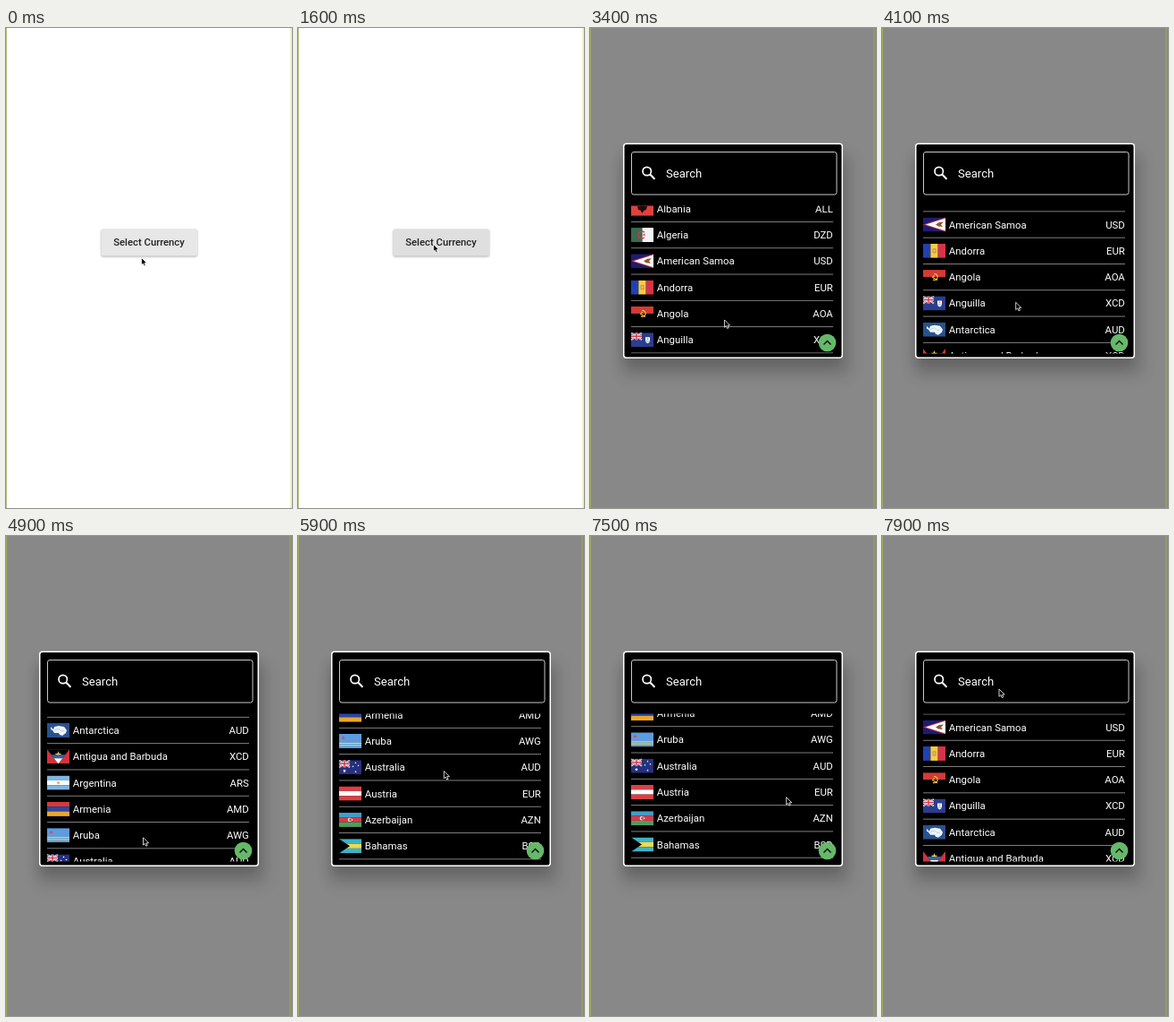
Animation of 320 by 536 pixels, one loop 8 s. Source, as an HTML page:

```html
<!DOCTYPE html>
<html lang="en">
<head>
<meta charset="utf-8">
<title>Currency picker</title>
<style>
  html, body { margin: 0; width: 100%; height: 100%; overflow: hidden; background: #fff; }
  svg { display: block; width: 320px; height: 536px; }
  text { font: 11.4px Roboto, sans-serif; fill: #fff; }
  .button { font-size: 11.3px; font-weight: 500; fill: #222; text-anchor: middle; }
  .search { font-size: 13.1px; }
  .code { text-anchor: end; }
  .soft { filter: blur(8px); }
  .lift { filter: drop-shadow(0 1px 1px rgba(0, 0, 0, .32)); }
</style>
</head>
<body>
<svg viewBox="0 0 320 536">
  <defs>
    <clipPath id="view"><rect x="40" y="198.5" width="240" height="165"/></clipPath>
    <clipPath id="flag"><rect width="25" height="16"/></clipPath>
  </defs>
  <rect id="button" class="lift" x="106.5" y="224.5" width="107.5" height="30" rx="2"/>
  <text class="button" x="160" y="243.3">Select Currency</text>

  <g id="dialog">
    <rect width="320" height="536" fill="#888"/>
    <rect class="soft" x="34" y="139" width="260" height="252" rx="8" opacity=".09"/>
    <rect class="soft" x="38" y="145" width="245" height="234" rx="6" opacity=".2"/>
    <rect x="37.75" y="129.25" width="244.5" height="239" rx="3" stroke="#fff" stroke-width="1.5"/>
    <rect x="46.5" y="138.5" width="229.5" height="47.5" rx="2.5" fill="none" stroke="#c8c8c8"/>
    <g fill="none" stroke="#fff" stroke-width="1.7">
      <circle cx="63.7" cy="160" r="4.7"/>
      <path d="M67 163.3l5.4 5.4" stroke-width="2"/>
    </g>
    <text class="search" x="85" y="166.6">Search</text>
    <g clip-path="url(#view)"><g id="list"></g></g>
    <rect id="hover" x="255.5" y="342" width="20" height="19" fill="#66bb6a" opacity=".45"/>
    <circle cx="265.5" cy="351.5" r="9.8" fill="#66b96a"/>
    <path d="M261.5 353.5l4-4 4 4" fill="none" stroke="#111" stroke-width="1.5"/>
  </g>

  <rect id="left" width="1" height="536"/>
  <rect id="right" height="536"/>
  <path id="cursor" d="M0 0V8.3L1.9 6.6 3.2 9.5 4.7 8.9 3.5 6.1H6.1Z" fill="#000" stroke="#fff" stroke-width=".8"/>
</svg>
<script>
const $ = id => document.getElementById(id);

// Flag drawing on a 25 x 16 field
const rect = (x, y, w, h, fill) => `<rect x="${x}" y="${y}" width="${w}" height="${h}" fill="${fill}"/>`;
const dot = (x, y, r, fill) => `<circle cx="${x}" cy="${y}" r="${r}" fill="${fill}"/>`;
const shape = (d, fill) => `<path d="${d}" fill="${fill}"/>`;
const line = (d, stroke, width) => `<path d="${d}" fill="none" stroke="${stroke}" stroke-width="${width}"/>`;
const field = fill => rect(0, 0, 25, 16, fill);
const rows = (...colors) => colors.map((c, i) => rect(0, i * 16 / colors.length, 25, 16 / colors.length, c)).join('');
const cols = (...colors) => colors.map((c, i) => rect(i * 25 / colors.length, 0, 25 / colors.length, 16, c)).join('');
const moon = (x, y, r, fill, back) => dot(x, y, r, fill) + dot(x + r * .35, y, r * .78, back);
const star = (x, y, r, fill) => {
  const points = Array.from({ length: 10 }, (_, i) => {
    const a = i * Math.PI / 5, d = i % 2 ? r * .42 : r;
    return `${x + d * Math.sin(a)},${y - d * Math.cos(a)}`;
  });
  return `<polygon points="${points.join(' ')}" fill="${fill}"/>`;
};
const jack = line('M0 0L12 8M12 0L0 8', '#fff', 1.8) + line('M0 0L12 8M12 0L0 8', '#d33a48', .7) +
  line('M6 0V8M0 4H12', '#fff', 2.8) + line('M6 0V8M0 4H12', '#d33a48', 1.5);

const countries = [
  ['Afghanistan', 'AFN', cols('#000', '#bd2a25', '#1d7a35') + line('M10 8a2.5 2.5 0 1 0 5 0a2.5 2.5 0 1 0-5 0', '#e8c9c0', .8) + rect(11.5, 7, 2, 2, '#e8c9c0')],
  ['Albania', 'ALL', field('#e0413c') + shape('M12.5 4.5L10.5 3l-1 1.5 1 1L7 5l1 4 2.5 1 2 3 2-3L17 9l1-4-3.500.5 1-1-1-1.500z', '#1c0a0a')],
  ['Algeria', 'DZD', cols('#3a6b50', '#f4f4f4') + line('M15 5.200a4 4 0 1 0 0 5.600', '#d6344a', 1.300) + star(14.5, 8, 1.8, '#d6344a')],
  ['American Samoa', 'USD', field('#1d1c70') + shape('M0 8L25 0V16Z', '#c8344a') + shape('M3 8L25 1V15Z', '#fff') + shape('M14 8l4-2.500 5-.5-3 3 2 2.500-5-.5z', '#8a5a2b')],
  ['Andorra', 'EUR', cols('#2140b4', '#f3d03e', '#d6334b') + rect(10.5, 5.5, 4, 5, '#c78a55') + rect(11.5, 6.5, 2, 3, '#e8c080')],
  ['Angola', 'AOA', rows('#d43a36', '#000') + line('M12 4.500a3.500 3.500 0 1 1-1 6.500M10 8l6 3.500', '#f0c440', 1.1) + star(12, 7, 1.4, '#f0c440')],
  ['Anguilla', 'XCD', field('#2b3d8e') + jack + shape('M16 5h5v4q0 2-2.500 3-2.500-1-2.500-3z', '#fff') + rect(16.2, 9, 4.6, 1, '#63b9d6') + dot(18.5, 7, 1.1, '#ef9b3c')],
  ['Antarctica', 'AUD', field('#28528f') + shape('M4 4l3 3 1-3 5-1 6 1 3 4-1 3-4 3-3-1-1-2-5 0-2-3-2-1z', '#edf3f8') + line('M8 8l5-2 3 3 3-1', '#9db9d8', .6)],
  ['Antigua and Barbuda', 'XCD', field('#d2333f') + shape('M0 0H25L12.5 16Z', '#000') + star(12.5, 6, 4, '#f5d040') + shape('M4.500 6H20.500L17.300 10H7.700Z', '#2f63b8') + shape('M7.700 10H17.300L12.500 16Z', '#fff')],
  ['Argentina', 'ARS', rows('#7db7e4', '#fff', '#7db7e4') + dot(12.5, 8, 1.7, '#e8b54a')],
  ['Armenia', 'AMD', rows('#d63a38', '#2b47a8', '#eda725')],
  ['Aruba', 'AWG', field('#5d9ce0') + rect(0, 10, 25, 1, '#f0dc57') + rect(0, 12.3, 25, 1, '#f0dc57') + star(4.5, 4.5, 2.4, '#d94858')],
  ['Australia', 'AUD', field('#25317f') + jack + [[6, 12, 2.1], [18.5, 3, 1.2], [15.5, 7, 1.2], [21.5, 6, 1.2], [18.500, 13, 1.3]].map(s => star(...s, '#fff')).join('')],
  ['Austria', 'EUR', rows('#dc3f45', '#fff', '#dc3f45')],
  ['Azerbaijan', 'AZN', rows('#3d9fc8', '#dc3848', '#4d9e5d') + moon(12, 8, 2.2, '#fff', '#dc3848') + star(14.5, 8, 1.2, '#fff')],
  ['Bahamas', 'BSD', rows('#3cb3c8', '#f1d94d', '#3cb3c8') + shape('M0 0L12 8L0 16Z', '#000')],
  ['Bahrain', 'BHD', field('#cc3b42') + shape('M0 0H7L10.500 1.600 7 3.200 10.500 4.800 7 6.400 10.500 8 7 9.600 10.500 11.200 7 12.800 10.500 14.400 7 16H0Z', '#fff')],
  ['Bangladesh', 'BDT', field('#2c6a50') + dot(11.5, 8, 4.6, '#df3e48')],
  ['Barbados', 'BBD', cols('#21377f', '#f0c04a', '#21377f') + line('M12.5 4V13M9.800 5q0 4 1 5h3.400q1-1 1-5', '#111', 1.1)]
];

const pitch = 29.3;
$('list').innerHTML = countries.map(([name, code, flag], i) => `
  <g transform="translate(0 ${207.5 + i * pitch})">
    <g transform="translate(46 -8)" clip-path="url(#flag)">${flag}</g>
    <text x="74.8" y="4">${name}</text>
    <text class="code" x="271.8" y="4">${code}</text>
    <rect x="46" y="14.2" width="226" height=".9" fill="#8c8c8c"/>
  </g>`).join('');

// Keys: [time, value...], linear in between
const scrollKeys = [[2800, 0], [4100, 75.9], [4900, 195.6], [5900, 300.8], [7100, 386.7]];
const cursorKeys = [
  [0, 151.5, 256.5], [200, 151.5, 241.5], [1800, 151.5, 241.5], [1900, 152.5, 239.3], [2500, 152.5, 239.3],
  [2700, 151, 340], [2900, 151, 340], [4100, 149.7, 306.3], [4900, 153.5, 336.8], [5900, 163.3, 262.5],
  [6900, 264, 352], [7300, 264, 352], [7900, 131, 171]
];

function at(keys, t) {
  const n = keys.findIndex(k => k[0] > t);
  if (n < 1) return (n ? keys[keys.length - 1] : keys[0]).slice(1);
  const a = keys[n - 1], b = keys[n], u = (t - a[0]) / (b[0] - a[0]);
  return a.slice(1).map((v, i) => v + (b[i + 1] - v) * u);
}

// Eased return to the top after the round button is pressed
function scrollAt(t) {
  const u = Math.min(1, Math.max(0, (t - 7200) / 995));
  return at(scrollKeys, t)[0] * (1 - u * u * (3 - 2 * u));
}

function set(id, attrs) {
  for (const name in attrs) $(id).setAttribute(name, attrs[name]);
}

const start = performance.now();

function draw() {
  const elapsed = (performance.now() - start) % 8000;
  const t = Math.floor(elapsed / 100) * 100; // ten pictures a second
  const open = t >= 1900;
  set('button', { fill: t >= 1600 ? '#dfdfdf' : '#e7e7e7' });
  set('dialog', { opacity: t >= 2000 ? 1 : open ? .5 : 0 });
  set('list', { transform: `translate(0 ${-scrollAt(t)})` });
  set('hover', { visibility: t >= 6900 && t < 7400 ? 'inherit' : 'hidden' });
  set('left', { fill: open ? '#a2ad60' : '#b4c07c' });
  set('right', open ? { x: 317.3, width: 1.2, fill: '#9ca35c' } : { x: 318.3, width: 1.7, fill: '#e6f0ac' });
  set('cursor', { transform: `translate(${at(cursorKeys, t)})` });
  requestAnimationFrame(draw);
}
draw();
</script>
</body>
</html>
```
